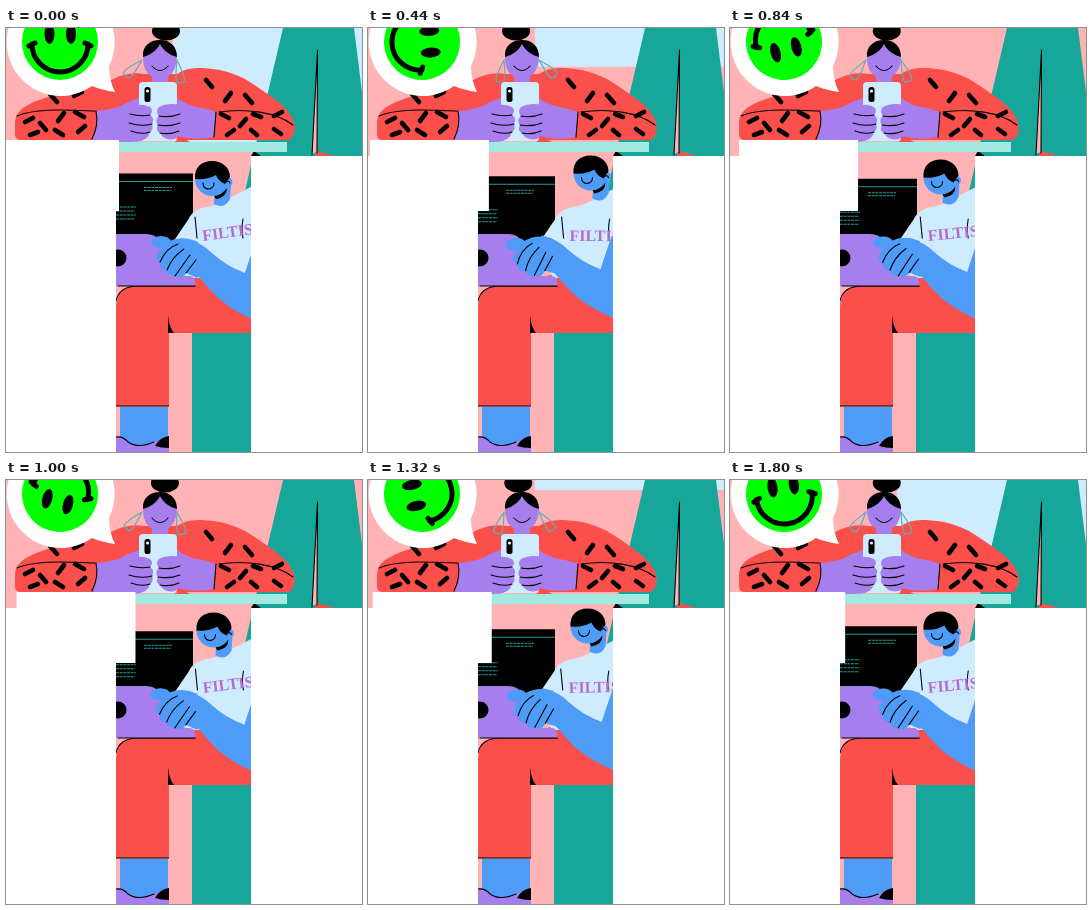
An HTML page for the animation above (1840 ms loop, 356x424 px).

```html
<!DOCTYPE html>
<html lang="en">
<head>
<meta charset="utf-8">
<title>Calls and code</title>
<style>
  /* sway: figures rocking, slide: slab, screen and window light, turn: smiley */
  @property --sway { syntax: "<number>"; inherits: true; initial-value: 0; }
  @property --slide { syntax: "<number>"; inherits: true; initial-value: 0; }
  @property --turn { syntax: "<angle>"; inherits: true; initial-value: 0deg; }

  html, body { margin: 0; width: 100%; height: 100%; overflow: hidden; background: #fff; }
  svg {
    display: block; width: 356px; height: 424px;
    animation: sway 1.84s infinite, slide 1.84s infinite, turn 1.84s steps(46) infinite;
  }
  @keyframes sway {
    0%       { --sway: 0; animation-timing-function: steps(12); }
    26.087%  { --sway: 1; animation-timing-function: steps(12); }
    52.174%  { --sway: 0; animation-timing-function: steps(12); }
    78.261%  { --sway: 1; animation-timing-function: steps(10); }
    100%     { --sway: .1667; }
  }
  @keyframes slide {
    0%      { --slide: 0; animation-timing-function: steps(24); }
    52.174% { --slide: 1; animation-timing-function: steps(22); }
    100%    { --slide: .0833; }
  }
  @keyframes turn { to { --turn: 360deg; } }

  .window { transform: translateY(calc(var(--slide) * -173px)); }
  .slab   { transform: translateX(calc(var(--slide) * 17.2px)); }
  .screen { transform: translateY(calc(var(--slide) * 6px)); }
  .smiley { transform: translate(54px, 14px) rotate(var(--turn)); }
  .bun    { transform: translateX(calc(var(--sway) * -13px)); }
  .ring   { transform: rotate(calc(18deg - var(--sway) * 38deg)); }
  .head   { transform: translate(calc(var(--sway) * 18px), calc(var(--sway) * -6px)); }
  .torso  { transform: translateX(calc(var(--sway) * 5px)); }
  .label  { transform: translate(197px, 213px) rotate(calc(var(--sway) * 9deg - 8deg)); }
  .arm    { transform: translate(calc(var(--sway) * -7px), calc(var(--sway) * -4px)); }
  .hand   { transform: rotate(calc(var(--sway) * -10deg)); transform-origin: 190px 226px; }

  .pink { fill: #ffb3b5; } .red { fill: #fb4f4b; } .violet { fill: #a67eee; }
  .blue { fill: #4f9bf8; } .pale { fill: #cfecff; } .teal { fill: #17a79a; }
  .mint { fill: #a3e9e1; } .white { fill: #fff; }
  .line { fill: none; stroke: #000; stroke-width: 1.1; stroke-linecap: round; }
  .hoop { fill: none; stroke: #62aeb0; stroke-width: 1.2; }
  .code { fill: none; stroke: #2b9b94; stroke-width: 1.2; stroke-dasharray: 3 .7; }
  .dash { fill: none; stroke: #000; stroke-width: 4.6; stroke-linecap: round; }
  .label { font: bold 16px "Liberation Serif", "Noto Serif", serif; fill: #b66bd0; }
</style>
</head>
<body>
<svg viewBox="0 0 356 424">
  <defs>
    <clipPath id="tee"><path d="M0 0H356V128H245V424H110V128H0Z"/></clipPath>
    <path id="hoop" d="M0 0C-2 8-5 15-4 22Q0 24 4 22C5 15 2 8 0 0Z"/>
  </defs>

  <g clip-path="url(#tee)">
    <!-- room -->
    <path class="pink" d="M0 0H356V424H0Z"/>
    <path class="pale window" d="M167 0H356V118H167Z"/>
    <path class="teal" d="M277 0H348L358 80V128H245V190H233L247 128Z"/>
    <path class="red" d="M311 123L329 128H309Z"/>
    <path class="pink" d="M311.500 22L306 126L311 124Z"/>
    <path class="line" d="M311.500 22L306 127M311.500 22L311 125"/>
    <path d="M248 123L255 128H245Z"/>

    <!-- woman -->
    <path class="red" d="M9 106V96C9 80 24 75 45 68C68 59 88 55 105 52Q122 43 138 46H171Q180 39 196 40C220 41 236 48 250 58C268 70 283 80 288 94Q291 106 283 112H15Q9 112 9 106Z"/>
    <path class="line" d="M11 88C30 80 60 82 89 83M213 84C240 80 270 84 287 97"/>
    <path class="dash" d="M44 66L51 74M68 68L76 64M19 94L27 90M34 95L40 102M52 93L58 85M69 84L78 89M24 107L32 104M49 102L57 107M72 104L79 98"/>
    <path class="dash" d="M200 52L206 59M219 73L225 65M239 67L246 75M215 86L223 90M234 98L240 91M247 86L255 89M268 88L276 84M221 107L228 102M245 102L251 107M268 101L275 106"/>
    <path class="violet" d="M146 44H162V53Q154 60 146 53Z"/>
    <path class="violet" d="M138 23Q154 8 170 23L171 31Q169 50 154 50Q138 50 137 31Z"/>
    <path d="M137 29C136 18 144 12 154 12C164 12 171 18 171 29C163 27 157 22 154 16C151 22 145 27 137 29Z"/>
    <ellipse class="bun" cx="160" cy="3" rx="14" ry="9.500"/>
    <path class="line" d="M146 38Q154 47 162 38"/>
    <g transform="translate(136 32) rotate(28)"><use href="#hoop" class="hoop ring"/></g>
    <g transform="translate(171 32) rotate(-28)"><use href="#hoop" class="hoop ring"/></g>

    <path class="violet" d="M86 111Q93 97 90 83Q110 82 122 74L136 69V110L124 115Q103 118 86 111Z"/>
    <path class="violet" d="M210 84L208 109Q191 113 171 108L169 69Q183 79 197 80Z"/>
    <path class="line" d="M90 83Q93 97 86 111M210 84L208 109"/>
    <rect class="pale" x="133" y="54" width="38" height="59" rx="4"/>
    <rect x="138.500" y="59" width="6" height="15" rx="2.500"/>
    <circle class="white" cx="141.500" cy="63" r="1.500"/>
    <path class="violet" d="M124 78Q136 75 144 79Q148 83 144 87Q149 90 146 96Q148 101 144 104Q142 113 129 114L121 106Z"/>
    <path class="violet" d="M175 77Q162 74 153 79Q149 83 153 88Q148 92 152 97Q149 102 154 105Q158 113 169 111L182 101Z"/>
    <path class="line" d="M124 86Q135 89 144 87M123 95Q135 99 146 96M125 103Q136 107 144 104M153 88Q164 90 174 86M152 97Q164 99 174 95M154 105Q164 107 173 103"/>
    <path class="red" d="M168 114Q176 108 184 114Z"/>
    <path class="mint" d="M110 114H281V124H110Z"/>

    <!-- screen -->
    <g class="screen">
      <path d="M110 145.500H187V214H110Z"/>
      <path class="code" style="stroke-dasharray:none" d="M110 153.500H187"/>
      <path class="code" d="M138 159.500H166M138 162.500H165M110 179H130M110 183H129M110 187H130M110 191H129"/>
    </g>

    <!-- seated man -->
    <path class="red" d="M110 283C110 266 116 258 132 258L188 246H245V305H163V378H110Z"/>
    <path class="line" d="M110 273C112 264 119 258 132 258H189M110 378H163"/>
    <path d="M162 287Q163 299 168 305H162Z"/>
    <g class="torso">
      <path class="pale" d="M227 168Q215 177 196 180Q186 183 182 192L167 214L180 250H262V150L237 163Z"/>
      <path class="line" d="M189 189L191 210M237 191Q235 202 237 210"/>
      <text class="label">FILTIS</text>
    </g>
    <g class="head">
      <path class="blue" d="M209 158H225L224 171Q218 182 208 176Z"/>
      <circle class="blue" cx="206" cy="151" r="17"/>
      <circle class="blue" cx="222" cy="154" r="4.500"/>
      <path d="M189 151C188 139 196 133 206 133C217 133 224 140 224 149L219 156Q212 153 210 147Q202 152 189 151Z"/>
      <path d="M208 168Q216 167 221 160Q221 169 210 171Z"/>
      <path class="line" d="M197 155Q197 161 203 161Q208 160 208 155M220 154Q223 152 224 155"/>
    </g>

    <path class="violet" d="M110 206H140Q150 206 153 213L164 248H184Q190 248 189 258H110Z"/>
    <path class="line" d="M112 258H189"/>
    <circle cx="112" cy="230" r="8.500"/>

    <g class="arm">
      <path class="blue" d="M180 211Q196 215 206 225Q220 238 239 245Q243 232 250 212L268 205V300Q233 288 212 270Q202 260 193 249L176 238Z"/>
      <g class="hand">
        <ellipse class="blue" cx="155" cy="214" rx="10" ry="6"/>
        <path class="blue" d="M163 213Q177 207 192 214L202 240L191 250L180 245Q176 252 169 248Q162 249 161 242Q153 242 154 234Q147 230 153 223Z"/>
        <path class="line" d="M154 234Q160 220 172 216M161 242Q166 229 178 221M169 248L184 227M180 245L190 232"/>
      </g>
    </g>

    <path class="teal" d="M186 305H245V424H186Z"/>
    <path class="pink" d="M163 305H186V424H163Z"/>
    <path class="blue" d="M114 379H162V422H114Z"/>
    <path class="violet" d="M110 409Q117 408 122 414Q132 421 148 414L163 408V424H110Z"/>
    <path d="M149 418Q154 409 163 408V420Q155 420 149 418Z"/>
    <path class="line" d="M110 409Q117 408 122 414Q132 421 148 414"/>

    <path class="white slab" d="M-6 112H113V183H-6Z"/>
    <path class="white" d="M0 183H110V424H0Z"/>

    <!-- bubble -->
    <path class="white" d="M54 -40A54 54 0 0 1 103 38Q103 52 109 64Q96 62 86 58A54 54 0 1 1 54 -40Z"/>
    <g class="smiley">
      <circle r="38" fill="#0f0"/>
      <ellipse cx="-10.500" cy="-8" rx="5" ry="10"/>
      <ellipse cx="11" cy="-8" rx="5" ry="10"/>
      <path d="M-28 2A28 28 0 0 0 28 2M-31 4L-25 1M31 4L25 1" fill="none" stroke="#000" stroke-width="5" stroke-linecap="round"/>
    </g>
  </g>
</svg>
</body>
</html>
```
